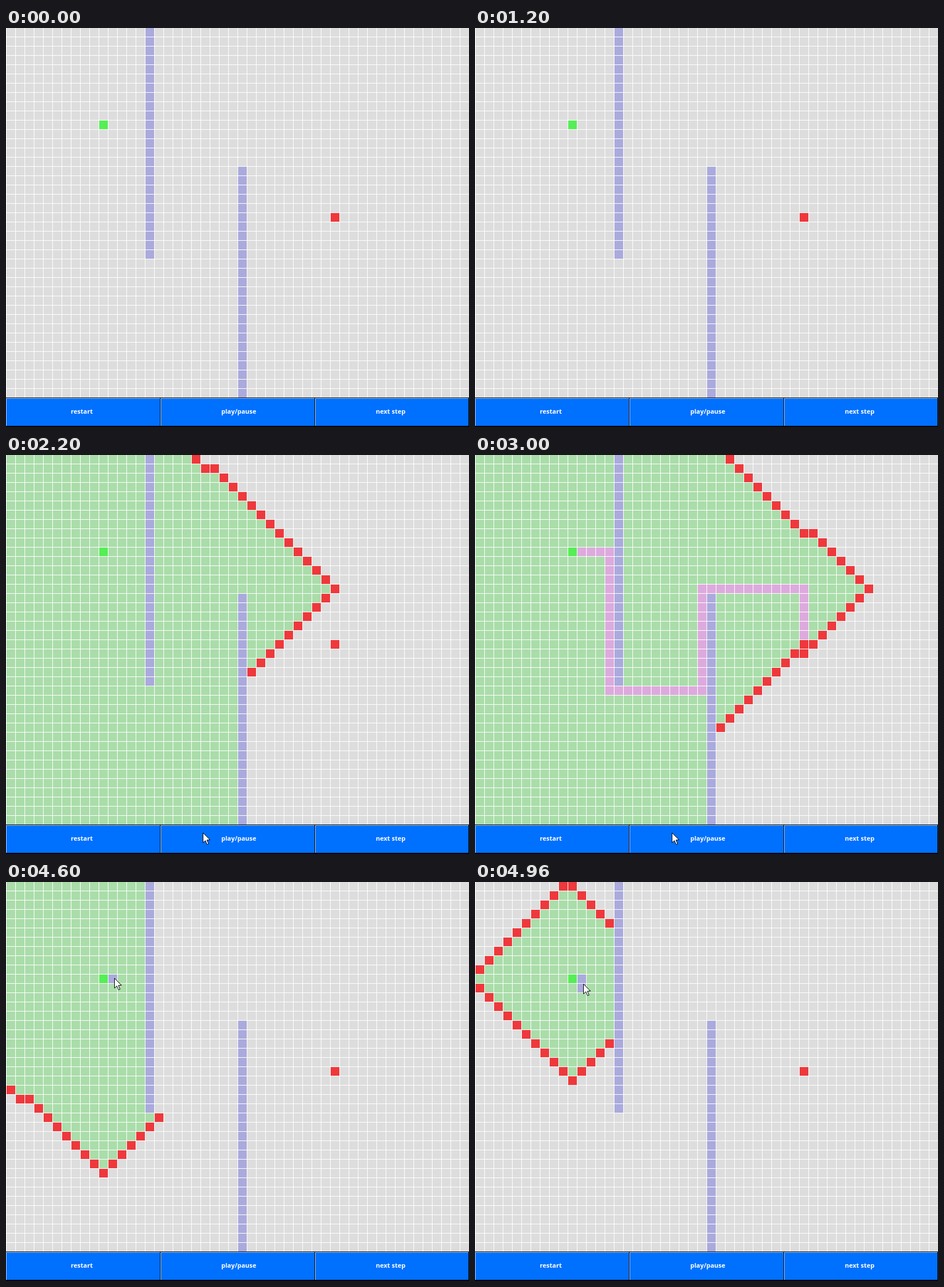
An HTML page with a canvas that plays this animation: 800 by 690 pixels, repeating every 5000 ms.

```html
<!DOCTYPE html>
<html lang="en">
<head>
<meta charset="utf-8">
<title>Path search</title>
<style>
  html, body { margin: 0; width: 100%; height: 100%; overflow: hidden; background: #000; }
  canvas { display: block; }
</style>
</head>
<body>
<canvas id="stage" width="800" height="690"></canvas>
<script>
const ctx = document.getElementById('stage').getContext('2d');
const LOOP = 5000, TICK = 40;
const COLS = 50, ROWS = 40, CELL = 16;
const START = [10, 10], END = [35, 20];
const STEPS_PER_MS = 5.5;
const MOVES = [[1, 0], [-1, 0], [0, 1], [0, -1]];
const COLOR = {
  empty: '#dddddd', line: '#ffffff', wall: '#aaaadd', visited: '#aaddaa',
  open: '#ee383c', path: '#ddaadd', start: '#55ee55', button: '#0070ff', edge: '#a8ccff'
};

// Each run is pinned to a number of expanded cells at a moment.
const RUNS = [
  { at: 2040, expanded: 174, drawn: [] },
  { at: 4680, expanded: 842, drawn: [[11, 10]] },
  { at: 4960, expanded: 178, drawn: [[11, 10], [11, 11]] }
].map(run => ({ ...run, begin: run.at - run.expanded / STEPS_PER_MS }));

// Pointer keys: time, x, y of the tip
const POINTER = [
  [1400, 470, 690], [1720, 340, 653], [3440, 340, 653], [3960, 180, 179],
  [4200, 180, 179], [4440, 187, 166], [4840, 187, 166], [4940, 187, 176], [LOOP, 187, 176]
];
const ARROW = [[0, 0], [0, 17], [4, 13.3], [7, 20], [9.6, 19], [6.7, 12.4], [12, 12]];

const BUTTONS = [
  { label: 'restart', x: 0, width: 266, textX: 112 },
  { label: 'play/pause', x: 267, width: 266, textX: 372 },
  { label: 'next step', x: 534, width: 265, textX: 639 }
];

const key = (x, y) => y * COLS + x;
const START_KEY = key(...START), END_KEY = key(...END);

function wallSet(drawn) {
  const walls = new Set(drawn.map(([x, y]) => key(x, y)));
  for (let y = 0; y < 25; y++) walls.add(key(15, y));
  for (let y = 15; y < ROWS; y++) walls.add(key(25, y));
  return walls;
}

// Breadth-first search, stopped after the given number of expansions
function search(walls, steps) {
  const queue = [START_KEY], parent = new Map([[START_KEY, -1]]), path = [];
  let head = 0;
  while (head < queue.length && head < steps) {
    const current = queue[head++];
    const cx = current % COLS, cy = Math.floor(current / COLS);
    for (const [dx, dy] of MOVES) {
      const x = cx + dx, y = cy + dy, next = key(x, y);
      if (x < 0 || y < 0 || x >= COLS || y >= ROWS) continue;
      if (walls.has(next) || parent.has(next)) continue;
      parent.set(next, current);
      queue.push(next);
    }
    if (current === END_KEY) {
      for (let k = END_KEY; k >= 0; k = parent.get(k)) path.push(k);
      break;
    }
  }
  return { visited: queue.slice(0, head), open: queue.slice(head), path };
}

function fillCells(keys, color) {
  ctx.fillStyle = color;
  for (const k of keys) {
    ctx.fillRect(k % COLS * CELL + 1, Math.floor(k / COLS) * CELL, CELL - 1, CELL - 1);
  }
}

function drawGrid(t) {
  ctx.fillStyle = COLOR.empty;
  ctx.fillRect(0, 0, 800, 640);
  ctx.fillStyle = COLOR.line;
  for (let i = 0; i < COLS; i++) ctx.fillRect(i * CELL, 0, 1, 640);
  for (let j = 0; j < ROWS; j++) ctx.fillRect(0, j * CELL + CELL - 1, 800, 1);

  const run = RUNS.filter(r => t >= r.begin).pop();
  const walls = wallSet(run ? run.drawn : []);
  if (run) {
    const steps = Math.round(run.expanded + (t - run.at) * STEPS_PER_MS);
    const { visited, open, path } = search(walls, steps);
    fillCells(visited, COLOR.visited);
    fillCells(open, COLOR.open);
    fillCells(path, COLOR.path);
  }
  fillCells(walls, COLOR.wall);
  fillCells([START_KEY], COLOR.start);
  fillCells([END_KEY], COLOR.open);
}

function drawButtons() {
  ctx.fillStyle = '#000';
  ctx.fillRect(0, 639, 800, 51);
  ctx.font = 'bold 11px "Open Sans", sans-serif';
  ctx.textBaseline = 'alphabetic';
  for (const { label, x, width, textX } of BUTTONS) {
    ctx.fillStyle = COLOR.edge;
    ctx.fillRect(x, 640, width, 48);
    ctx.fillStyle = COLOR.button;
    ctx.fillRect(x + 1, 641, width - 1, 47);
    ctx.fillStyle = '#fff';
    ctx.fillText(label, textX, 667);
  }
}

function drawPointer(t) {
  if (t < POINTER[0][0]) return;
  const i = POINTER.findIndex(p => p[0] > t);
  const [t0, x0, y0] = POINTER[i - 1], [t1, x1, y1] = POINTER[i];
  const u = (t - t0) / (t1 - t0), e = u * u * (3 - 2 * u);
  const x = Math.round(x0 + (x1 - x0) * e) + 0.5;
  const y = Math.round(y0 + (y1 - y0) * e) + 0.5;
  ctx.beginPath();
  for (const [px, py] of ARROW) ctx.lineTo(x + px, y + py);
  ctx.closePath();
  ctx.fillStyle = '#fff';
  ctx.fill();
  ctx.strokeStyle = '#000';
  ctx.lineWidth = 1;
  ctx.stroke();
}

let origin = null, lastTick = -1;
function frame(now) {
  if (origin === null) origin = now;
  const tick = Math.floor(((now - origin) % LOOP + 0.5) / TICK) % (LOOP / TICK);
  if (tick !== lastTick) {
    lastTick = tick;
    drawGrid(tick * TICK);
    drawButtons();
    drawPointer(tick * TICK);
  }
  requestAnimationFrame(frame);
}
requestAnimationFrame(frame);
</script>
</body>
</html>
```
